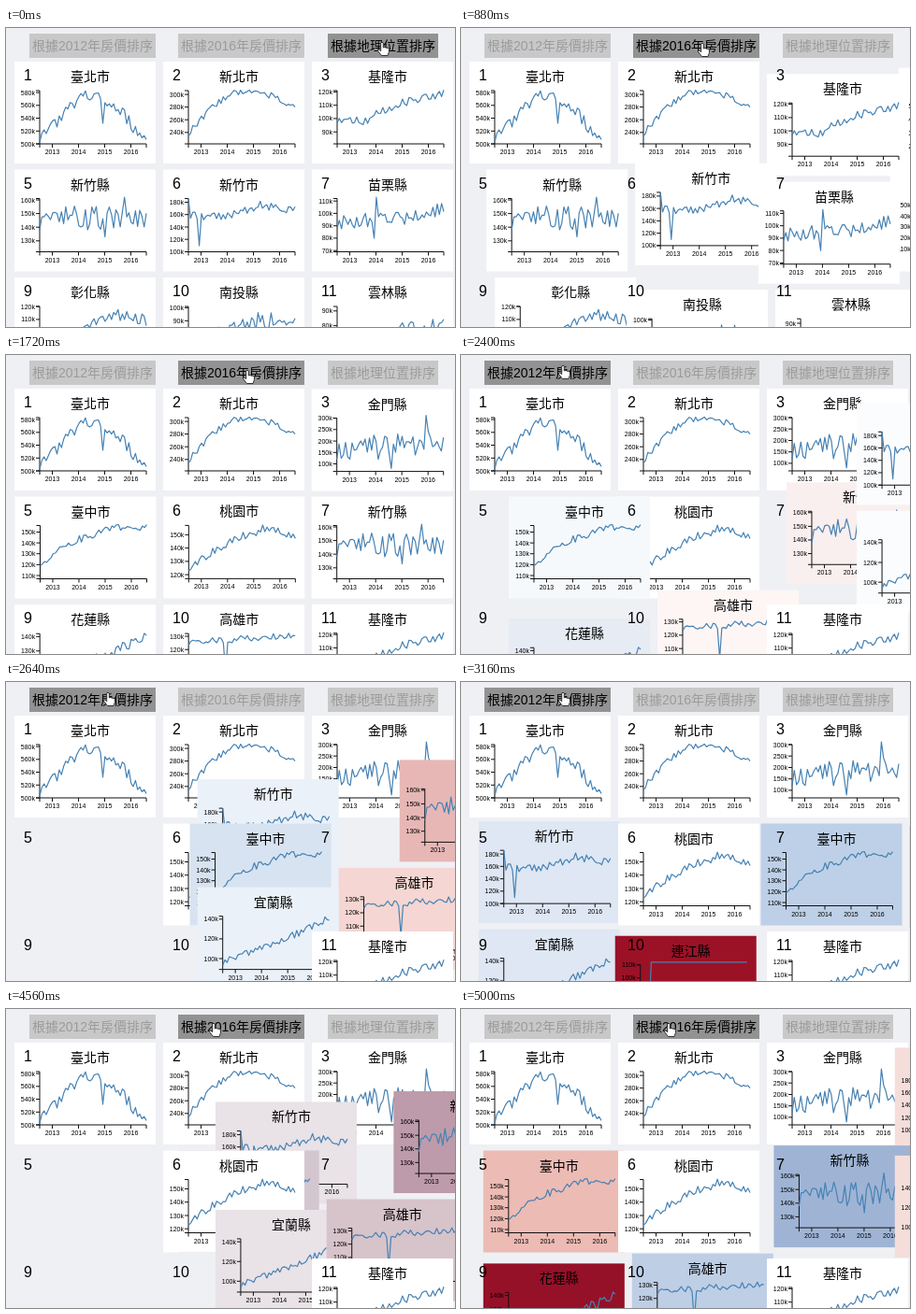
An HTML page that plays this animation: 480 px wide and 320 px high, repeating every 5040 ms.

```html
<!DOCTYPE html>
<html lang="zh-Hant">
<meta charset="utf-8">
<style>
  html, body { margin: 0; width: 100%; height: 100%; overflow: hidden; background: #eff0f4; }
  svg { display: block; width: 480px; height: 320px; font: 14px "Liberation Sans", "Noto Sans CJK TC", "Noto Sans CJK", sans-serif; }
  .button rect { fill: #c8c8c8; }
  .button text { fill: #9b9b9b; }
  .active rect { fill: #929292; }
  .active text { fill: #000; }
  .button text, .title, .year { text-anchor: middle; }
  .tick, .year { font-size: 7px; }
  .tick { text-anchor: end; }
  .number { font-size: 16px; }
  .axis { fill: none; stroke: #111; }
  .line { fill: none; stroke: #4682b4; stroke-width: 1.2; stroke-linejoin: round; }
</style>
<svg viewBox="0 0 480 320">
  <g id="buttons"></g>
  <g id="cards"></g>
  <g id="numbers"></g>
  <path id="cursor" fill="#fff" stroke="#222" stroke-width=".9" stroke-linejoin="round"
    d="M-1.3 1Q0-.6 1.3 1V6L3 5.4 4.4 6.3 6 6.2 7.4 7.2V10.5L6 14.5H-.5L-4.5 9.4Q-4.6 7.6-3 8.2L-1.3 9.6Z"/>
</svg>
<script>
const LOOP = 5040, MONTHS = 50, WIDTH = 114, HEIGHT = 57;
const $ = id => document.getElementById(id);
const split = s => s.split(' ');
const clamp = v => Math.max(0, Math.min(1, v));
const mix = (a, b, p) => a + (b - a) * p;

const geo = split('臺北市 新北市 基隆市 桃園市 新竹縣 新竹市 苗栗縣 臺中市 彰化縣 南投縣 雲林縣 嘉義縣 嘉義市 臺南市 高雄市 屏東縣 宜蘭縣 花蓮縣 臺東縣 澎湖縣 金門縣 連江縣');
const by2016 = split('臺北市 新北市 金門縣 新竹市 臺中市 桃園市 新竹縣 宜蘭縣 花蓮縣 高雄市 基隆市 彰化縣 臺南市 苗栗縣 澎湖縣 嘉義市 連江縣 臺東縣 南投縣 雲林縣 嘉義縣 屏東縣');
const by2012 = split('臺北市 新北市 金門縣 新竹縣 新竹市 桃園市 臺中市 高雄市 宜蘭縣 連江縣 基隆市 彰化縣 臺南市 苗栗縣 花蓮縣 澎湖縣 嘉義市 臺東縣 南投縣 雲林縣 嘉義縣 屏東縣');

// The cursor arrives at (x, y) just before each sort starts
const sorts = [
  { start: 812, span: 950, from: geo, to: by2016, button: 1, x: 258, y: 16 },
  { start: 2267, span: 1096, from: by2016, to: by2012, button: 0, x: 109, y: 11, tinted: true },
  { start: 4304, span: 954, from: by2012, to: by2016, button: 1, x: 222, y: 15, tinted: true },
];

const slot = i => ({ x: 9 + i % 4 * 159, y: 36 + Math.floor(i / 4) * 115.5 });

// cubic-bezier(.25, .1, .25, 1)
function ease(t) {
  let lo = 0, hi = 1;
  for (let i = 0; i < 24; i++) {
    const s = (lo + hi) / 2;
    if (.75 * s - .75 * s * s + s ** 3 < t) lo = s; else hi = s;
  }
  return .3 * lo * (1 - lo) ** 2 + 3 * lo * lo * (1 - lo) + lo ** 3;
}

// Linear interpolation through evenly spaced points, u from 0 to 1
function along(points, u) {
  const at = u * (points.length - 1), i = Math.min(Math.floor(at), points.length - 2);
  return mix(points[i], points[i + 1], at - i);
}
const trend = (...points) => u => along(points, u);

function randomFrom(seed) {
  return () => (seed = seed * 16807 % 2147483647) / 2147483647;
}

// Prices in thousands: a trend with random noise, and single months that jump out
const cards = {};
function addCard(name, low, high, price, noise, jumps = {}) {
  const span = high - low, step = span > 150 ? 50 : span > 50 ? 20 : 10;
  const yOf = value => +((high - value) / span * HEIGHT).toFixed(1);
  const random = randomFrom(977 * (geo.indexOf(name) + 3));

  let axis = `M-4 0H0V${HEIGHT}H-4M0 61V${HEIGHT}H${WIDTH}V61`, labels = '';
  for (let v = Math.ceil(low / step) * step; v <= high; v += step) {
    axis += `M-4 ${yOf(v)}H0`;
    labels += `<text class="tick" x="-5" y="${yOf(v) + 2.5}">${v}k</text>`;
  }
  for (let i = 0; i < 4; i++) {
    const x = 13.5 + i * 28;
    axis += `M${x} ${HEIGHT}v4`;
    labels += `<text class="year" x="${x}" y="68">${2013 + i}</text>`;
  }
  const line = Array.from({ length: MONTHS }, (_, m) => {
    const u = m / (MONTHS - 1), value = price(u) + (random() * 2 - 1) * noise;
    return `${(u * WIDTH).toFixed(1)} ${Math.max(-3, yOf(jumps[m] ?? value))}`;
  });

  const g = document.createElementNS('http://www.w3.org/2000/svg', 'g');
  g.innerHTML = `<rect width="151" height="109"/><text class="title" x="81" y="21">${name}</text>
    <g transform="translate(27 31)"><path class="axis" d="${axis}"/>${labels}
    <path class="line" d="M${line.join('L')}"/></g>`;
  cards[name] = g;
}

addCard('臺北市', 500, 583, trend(513, 528, 557, 568, 580, 571, 557, 527, 515), 11, { 29: 532 });
addCard('新北市', 222, 306, trend(239, 277, 302, 305, 297, 280), 5);
addCard('基隆市', 81, 121, trend(100, 97, 109, 115, 119), 3.5);
addCard('桃園市', 117, 157, trend(126, 139, 149, 156, 149), 3.5);
addCard('新竹縣', 122, 161, trend(146, 148), 9, { 30: 133, 39: 162 });
addCard('新竹市', 100, 186, trend(160, 157, 175, 166), 7, { 0: 186, 5: 110 });
addCard('苗栗縣', 69, 112, trend(93, 95, 103), 6, { 17: 80, 18: 113 });
addCard('臺中市', 107, 156, trend(122, 142, 154, 155), 3.5);
addCard('彰化縣', 79, 120, trend(90, 98, 114, 109), 5);
addCard('南投縣', 60, 101, trend(72, 88, 92), 7);
addCard('雲林縣', 57, 93, trend(65, 75, 80), 6);
addCard('高雄市', 92, 132, trend(125, 131), 2.5, { 17: 103 });
addCard('宜蘭縣', 89, 143, trend(96, 109, 124, 142), 4);
addCard('花蓮縣', 105, 142, trend(109, 123, 141), 4);
addCard('金門縣', 67, 300, trend(155, 205), 55, { 25: 80, 41: 312 });
addCard('連江縣', 69, 110, u => u < .1 ? 69 : 112, 0);
geo.filter(name => !cards[name]).forEach(name => addCard(name, 65, 105, trend(75, 98), 5));

$('buttons').innerHTML = [[25, 135, '根據2012年房價排序'], [184, 135, '根據2016年房價排序'], [344, 118, '根據地理位置排序']]
  .map(([x, w, label]) => `<g class="button"><rect x="${x}" y="6" width="${w}" height="26"/>
    <text x="${x + w / 2}" y="24">${label}</text></g>`).join('');

$('numbers').innerHTML = geo.map((_, i) => {
  const { x, y } = slot(i);
  return `<text class="number" x="${x + 10}" y="${y + 20}">${i + 1}</text>`;
}).join('');

// Colour channels for a change of rank: red when rising, blue when falling
const reds = [[255, 238, 192, 153], [255, 186, 80, 13], [255, 178, 86, 34]];
const blues = [[255, 188, 125, 62], [255, 207, 157, 105], [255, 231, 202, 168]];
function tint(sort, name) {
  const rise = sort?.tinted ? sort.from.indexOf(name) - sort.to.indexOf(name) : 0;
  return (rise > 0 ? reds : blues).map(channel => along(channel, clamp(Math.abs(rise) / 6)));
}

let shown;
function draw(now) {
  const t = now % LOOP;
  const index = sorts.filter(s => t >= s.start).length - 1;
  const sort = sorts[Math.max(0, index)], before = sorts[index - 1];
  const p = ease(clamp((t - sort.start) / sort.span));

  if (index !== shown) {
    shown = index;
    $('cards').append(...sort.to.map(name => cards[name]));
    const active = index < 0 ? 2 : sort.button;
    [...$('buttons').children].forEach((b, i) => b.classList.toggle('active', i === active));
  }

  for (const name of geo) {
    const a = slot(sort.from.indexOf(name)), b = slot(sort.to.indexOf(name)), g = cards[name];
    g.setAttribute('transform', `translate(${mix(a.x, b.x, p)} ${mix(a.y, b.y, p)})`);
    const end = tint(sort, name);
    const fill = tint(before, name).map((c, i) => Math.round(mix(c, end[i], p)));
    g.firstChild.setAttribute('fill', `rgb(${fill})`);
  }

  let x = 402, y = 15;
  for (const s of sorts) {
    const u = clamp((t - s.start + 450) / 420), q = u * u * (3 - 2 * u);
    x = mix(x, s.x, q);
    y = mix(y, s.y, q);
  }
  $('cursor').setAttribute('transform', `translate(${x} ${y})`);
}

const begin = performance.now();
function tick() {
  draw(performance.now() - begin);
  requestAnimationFrame(tick);
}
tick();
</script>
</html>
```
